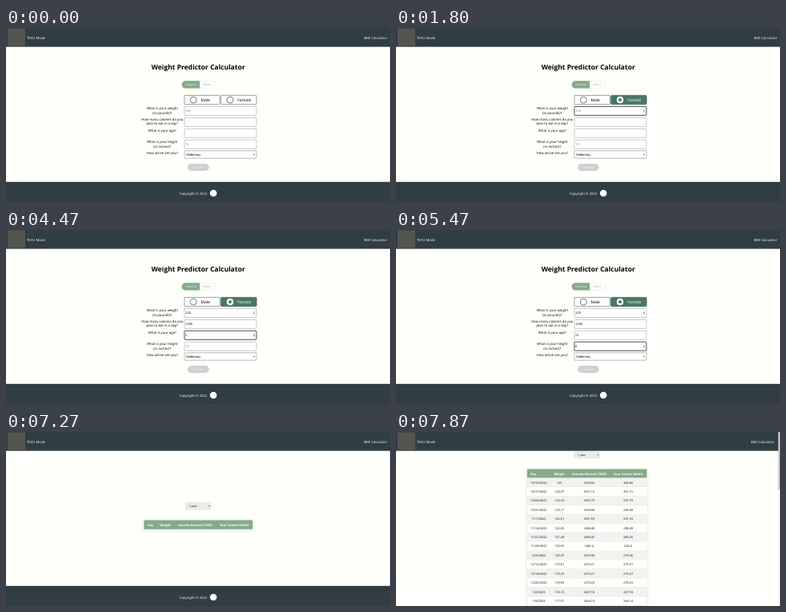
Write an HTML page that moves like this. It is 480x218 px and loops after 8000 ms.

```html
<!DOCTYPE html>
<html lang="en">
<head>
<meta charset="utf-8">
<title>Weight Predictor Calculator</title>
<style>
  html, body { margin: 0; width: 100%; height: 100%; overflow: hidden; background: #fffffb; }
  svg { display: block; width: 480px; height: 218px; }
  text { font: 500 4.28px "Open Sans", "Noto Sans", sans-serif; text-rendering: geometricPrecision; }
  .mid { text-anchor: middle; }
  .field { font-family: "Liberation Sans", Arial, sans-serif; font-size: 4px; font-weight: 400; }
  .title { font-size: 8.5px; font-weight: 700; }
  .small { font-size: 3.6px; }
  .button { font-size: 3.9px; }
  .option { font-size: 5.02px; }
  .head { font-size: 3.85px; font-weight: 700; fill: #fff; }
  .cell { font-size: 3.8px; }
</style>
</head>
<body>
<svg id="stage" viewBox="0 0 480 218"></svg>
<script>
const LOOP = 8000;
const DARK = '#303d43', GREEN = '#84ab88', TEAL = '#4a7666', PAGE = '#fffffb';
const stage = document.getElementById('stage');

function add(parent, tag, attrs, content) {
  const el = document.createElementNS('http://www.w3.org/2000/svg', tag);
  for (const key in attrs) el.setAttribute(key, attrs[key]);
  if (content !== undefined) el.textContent = content;
  parent.append(el);
  return el;
}
const group = (parent = stage) => add(parent, 'g', {});
const rect = (parent, x, y, width, height, fill, more) =>
  add(parent, 'rect', { x, y, width, height, fill, ...more });
const circle = (parent, cx, cy, r, fill, more) =>
  add(parent, 'circle', { cx, cy, r, fill, ...more });
const text = (parent, x, y, str, cls = '', fill = '#000') =>
  add(parent, 'text', { x, y, class: cls, fill }, str);
const chevron = (parent, x, y) =>
  add(parent, 'path', { d: `M${x - 1} ${y - 0.5}l1 1.1 1-1.1`, fill: 'none', stroke: '#222', 'stroke-width': 0.6 });

// Last value in a [time, value] list that has started.
const at = (steps, t) => steps.reduce((v, [start, value]) => t >= start ? value : v, steps[0][1]);
const ramp = (t, from, to) => Math.min(1, Math.max(0, (t - from) / (to - from)));
const show = (el, on) => el.setAttribute('visibility', on ? 'inherit' : 'hidden');
const fade = (el, v) => el.setAttribute('opacity', v);

rect(stage, 0, 0, 480, 218, PAGE);

// Form
const form = group();
text(form, 240.3, 51.6, 'Weight Predictor Calculator', 'title mid');

rect(form, 219.9, 66.5, 42.2, 8.8, '#fff', { rx: 4.4, stroke: '#d3ddd5', 'stroke-width': 0.4 });
add(form, 'path', { d: 'M242.2 66.3H224.3a4.6 4.6 0 0 0 0 9.2h17.9z', fill: GREEN });
text(form, 231.2, 72.2, 'Imperial', 'small mid', '#f2f7f2');
text(form, 251.9, 72.2, 'Metric', 'small mid', '#8db3a4');

function option(parent, x, label, picked) {
  const g = group(parent);
  rect(g, x, 84.4, 44.3, 11.3, picked ? TEAL : '#fff',
    { rx: 1, stroke: picked ? TEAL : '#5a6164', 'stroke-width': 0.6 });
  circle(g, x + 11.3, 90.1, 4, '#fff', { stroke: picked ? '#fff' : '#46625f', 'stroke-width': 0.8 });
  if (picked) circle(g, x + 11.3, 90.1, 2, TEAL);
  text(g, x + 20.5, 91.9, label, 'option', picked ? '#fff' : '#000');
  return g;
}
option(form, 223, 'Male', false);
option(form, 268.8, 'Female', false);
const picked = option(form, 268.8, 'Female', true);

const labels = [
  [102, 'What is your weight'], [108.2, '(in pounds)?'],
  [115.8, 'How many calories do you'], [121.2, 'plan to eat in a day?'],
  [129.5, 'What is your age?'],
  [143.7, 'What is your height'], [149.8, '(in inches)?'],
  [157.5, 'How active are you?']
];
labels.forEach(([y, str]) => text(form, 195.3, y, str, 'mid'));

function box(y, h, color) {
  const el = rect(form, 223, y, 90, h, '#fff', { rx: 0.8 });
  return on => {
    el.setAttribute('stroke', on ? '#202426' : color);
    el.setAttribute('stroke-width', on ? 0.8 : 0.5);
  };
}

function field(y, hint, typed, focus, hover) {
  const outline = box(y, 11, '#8f9394');
  const value = text(form, 224.3, y + 7, '', 'field');
  const spin = add(form, 'path', {
    d: `M309.2 ${y + 5.1}l.9-1.4.9 1.4zM309.2 ${y + 6}l.9 1.4.9-1.4z`, fill: '#4a4a4a'
  });
  const within = (span, t) => !!span && t >= span[0] && t < span[1];
  return t => {
    const str = at([[0, ''], ...typed], t);
    value.textContent = str || hint;
    value.setAttribute('fill', str ? '#111' : '#858585');
    outline(within(focus, t));
    show(spin, within(focus, t) || within(hover, t));
  };
}
const fields = [
  field(98.4, '150', [[1930, '1'], [2200, '12'], [2470, '125']], [1200, 3000], [1200, 6200]),
  field(112.4, '', [[3330, '1'], [3530, '12'], [3800, '120'], [3930, '1200']], [3000, 4070]),
  field(126.3, '', [[4470, '2'], [4670, '21']], [4070, 4930]),
  field(140.2, '70', [[5470, '6'], [5600, '60']], [4930, 6270])
];

const selectOutline = box(153.8, 9.4, '#707475');
text(form, 225, 159.9, 'Sedentary', 'field');
chevron(form, 310, 158.5);

rect(form, 227, 170.1, 26.8, 8.8, '#cdd2d0', { rx: 4.4 });
const submit = rect(form, 227, 170.1, 26.8, 8.8, GREEN, { rx: 4.4 });
const submitText = text(form, 240.4, 175.9, 'Submit', 'button mid');

// Results
function yearSelect(parent, x, y) {
  rect(parent, x, y, 32.8, 9.9, '#ececea', { rx: 1.2 });
  text(parent, x + 4.5, y + 6.3, '1 year', 'small');
  chevron(parent, x + 30.3, y + 5);
}
function tableHead(parent, x, y, w, columns) {
  rect(parent, x, y, w, 11.1, GREEN, { rx: 1 });
  const names = ['Day', 'Weight', 'Calories Burned (TDEE)', 'Your Calorie Deficit'];
  names.forEach((name, i) => text(parent, columns[i], y + 7, name, 'head mid'));
}
const shadow = (parent, x, y, w, h) => [3, 2, 1].forEach(d =>
  rect(parent, x - d, y - d + 0.8, w + 2 * d, h + 2 * d, '#000', { rx: 1 + d, opacity: 0.018 }));

const empty = group();
yearSelect(empty, 223.9, 87.5);
shadow(empty, 172.6, 110.6, 135.6, 11.1);
tableHead(empty, 172.6, 110.6, 135.6, [180.6, 199.2, 236.3, 285.4]);

const filled = group();
yearSelect(filled, 222.1, 23.4);
shadow(filled, 164, 46.5, 149.5, 180);
tableHead(filled, 164, 46.5, 149.5, [171.7, 204.2, 241.4, 290.3]);
const weights = [125, 124.37, 123.74, 123.17, 122.61, 122.05, 121.49, 120.93,
  120.37, 119.81, 119.25, 118.69, 118.13, 117.57];
const burned = [1504.56, 1501.15, 1497.73, 1494.58, 1491.53, 1488.49, 1485.45, 1482.4,
  1479.36, 1476.31, 1473.27, 1470.23, 1467.18, 1464.14];
const PITCH = 11.42;
weights.forEach((weight, i) => {
  const y = 57.6 + i * PITCH;
  const d = new Date(2022, 9, 10 + 7 * i);
  const day = `${d.getMonth() + 1}/${d.getDate()}/${d.getFullYear()}`;
  rect(filled, 164, y, 149.5, PITCH, i % 2 ? PAGE : '#f2f2f0');
  rect(filled, 164, y + PITCH - 0.4, 149.5, 0.4, '#dcdddb');
  const cells = [day, weight, burned[i], +(burned[i] - 1200).toFixed(2)];
  cells.forEach((cell, c) => text(filled, [178.4, 204.2, 241.2, 290.2][c], y + 6.9, cell, 'cell mid'));
});

// Header, footer and scrollbar
rect(stage, 0, 0, 480, 23.6, DARK);
rect(stage, 2, 0.5, 22, 22, '#55554f');
text(stage, 26, 13.6, 'TEVU Mode', '', '#fff');
const link = text(stage, 447.4, 13.6, 'BMI Calculator', '', '#fff');

const footer = group();
rect(footer, 0, 192.8, 480, 25.2, DARK);
text(footer, 216.7, 208.9, 'Copyright © 2022', '', '#fff');
circle(footer, 259.2, 207, 4.3, '#fff');

const scrollbar = group();
rect(scrollbar, 477.8, 0, 2.2, 218, '#f4f4f3');
rect(scrollbar, 478.1, 0.5, 1.7, 72, '#b9bbbb', { rx: 0.8 });

function draw(t) {
  const results = t >= 7270, scrolled = t >= 7870;
  show(form, !results);
  show(empty, results && !scrolled);
  show(filled, scrolled);
  show(scrollbar, scrolled);
  show(footer, !scrolled);
  link.setAttribute('x', scrolled ? 443.8 : 447.4);

  fade(picked, at([[0, 0], [730, 0.35], [870, 0.8], [1000, 1]], t));
  fields.forEach(update => update(t));
  selectOutline(t >= 6270 && t < 7070);

  const ready = ramp(t, 5480, 5730);
  fade(submit, ready);
  submit.setAttribute('fill', t >= 6670 ? '#7aa280' : GREEN);
  submitText.setAttribute('fill', ready > 0.5 ? '#fff' : '#f1f3f2');
}

function tick() {
  draw(performance.now() % LOOP);
  requestAnimationFrame(tick);
}
tick();
</script>
</body>
</html>
```
